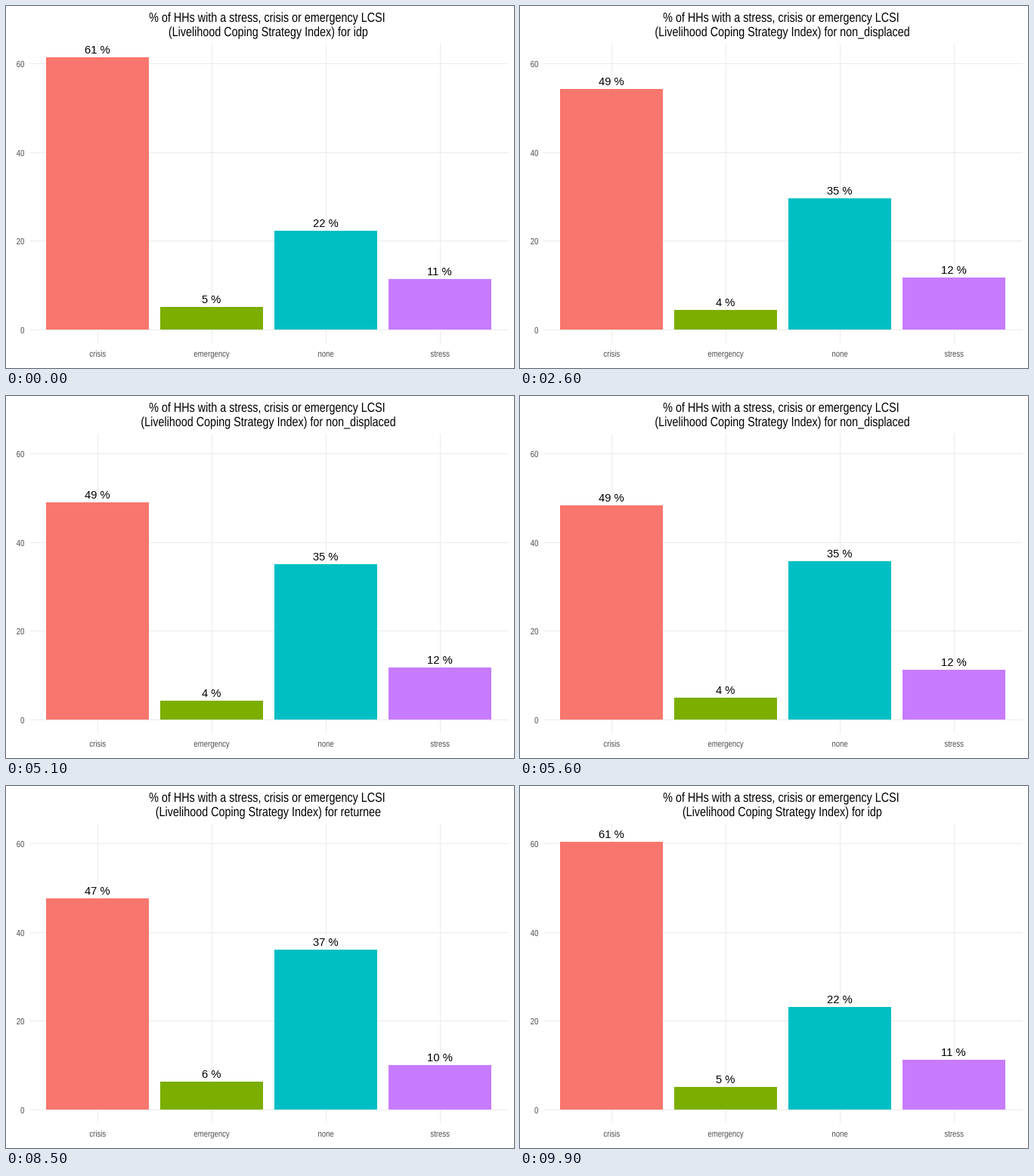
A matplotlib script that plays this animation: 672x480 px, repeating every 10 s.

```python
import matplotlib.pyplot as plt
from matplotlib.animation import FuncAnimation
from matplotlib.patches import PathPatch, Rectangle
from matplotlib.textpath import TextPath
from matplotlib.transforms import Affine2D

W, H, DPI = 672, 480, 96
FRAMES, INTERVAL = 100, 100

GROUPS = ["idp", "non_displaced", "returnee"]
LEVELS = ["crisis", "emergency", "none", "stress"]
COLORS = ["#F8766D", "#7CAE00", "#00BFC4", "#C77CFF"]
SHARES = [
    [61.4, 5.1, 22.3, 11.4],
    [49.2, 4.2, 34.9, 11.95],
    [46.75, 6.45, 37.0, 10.0],
]
# last still frame and number of steps of each transition
MOVES = [(16, 17), (50, 16), (84, 16)]

BASE, UNIT = 429.4, 5.883
LEFT, RIGHT, TOP, BOTTOM = 31, 665, 50, 447
STEP, BAR_W = 150.95, 136
FONT = "Liberation Sans"
NARROW = 0.815  # proportion of a narrow sans face

fig = plt.figure(figsize=(W / DPI, H / DPI), dpi=DPI, facecolor="white")
ax = fig.add_axes([0, 0, 1, 1])
ax.set_xlim(0, W)
ax.set_ylim(H, 0)
ax.axis("off")


def box(x, y, w, h, color, z):
    rect = Rectangle((x, y), w, h, fc=color, lw=0, antialiased=False, zorder=z)
    return ax.add_patch(rect)


def narrow_text(x, base, text, size, color="black", align=0.5):
    """Text in narrow proportions; align is the anchor along its width."""
    path = TextPath((0, 0), text, size=size, prop={"family": FONT})
    path = Affine2D().scale(NARROW, -1).transform_path(path)
    ext = path.get_extents()
    shift = x - ext.x0 - align * ext.width
    path = Affine2D().translate(shift, base).transform_path(path)
    return ax.add_patch(PathPatch(path, fc=color, lw=0, zorder=4))


def y_pos(value):
    return BASE - value * UNIT


def state_at(frame):
    """Start group, end group and progress between them."""
    for i, (start, steps) in enumerate(MOVES):
        if frame <= start:
            return i, i, 0.0
        if frame < start + steps:
            return i, (i + 1) % 3, (frame - start) / steps
    return 0, 0, 0.0


for tick in (0, 20, 40, 60):
    y = int(y_pos(tick))
    box(LEFT, y, RIGHT - LEFT, 1, "#EBEBEB", 1)
    narrow_text(24, y + 5, str(tick), 11.73, "#4D4D4D", 1)

bars, labels = [], []
for i, (level, color) in enumerate(zip(LEVELS, COLORS)):
    center = 121.3 + i * STEP
    box(int(center), TOP, 1, BOTTOM - TOP, "#EBEBEB", 1)
    narrow_text(center, 465, level, 11.73, "#4D4D4D")
    bars.append(box(round(center - BAR_W / 2), 0, BAR_W, 1, color, 2))
    labels.append(ax.text(center - 0.5, 0, "", size=11.04, color="black",
                          family=FONT, ha="center", va="baseline", zorder=4))

narrow_text(345, 21, "% of HHs with a stress, crisis or emergency LCSI", 17.6)
titles = [narrow_text(347, 40, f"(Livelihood Coping Strategy Index) for {g}", 17.6)
          for g in GROUPS]


def draw(frame):
    a, b, t = state_at(frame)
    near = a if t < 0.5 else b
    for i, title in enumerate(titles):
        title.set_visible(i == near)
    for i, (bar, label) in enumerate(zip(bars, labels)):
        value = SHARES[a][i] + (SHARES[b][i] - SHARES[a][i]) * t
        top = round(y_pos(value))
        bar.set_y(top)
        bar.set_height(int(BASE) - top)
        label.set_y(top - 5)
        label.set_text(f"{SHARES[near][i]:.0f} %")
    return bars + labels + titles


anim = FuncAnimation(fig, draw, frames=FRAMES, interval=INTERVAL,
                     init_func=lambda: draw(0), repeat=True, repeat_delay=0)
plt.show()
```
